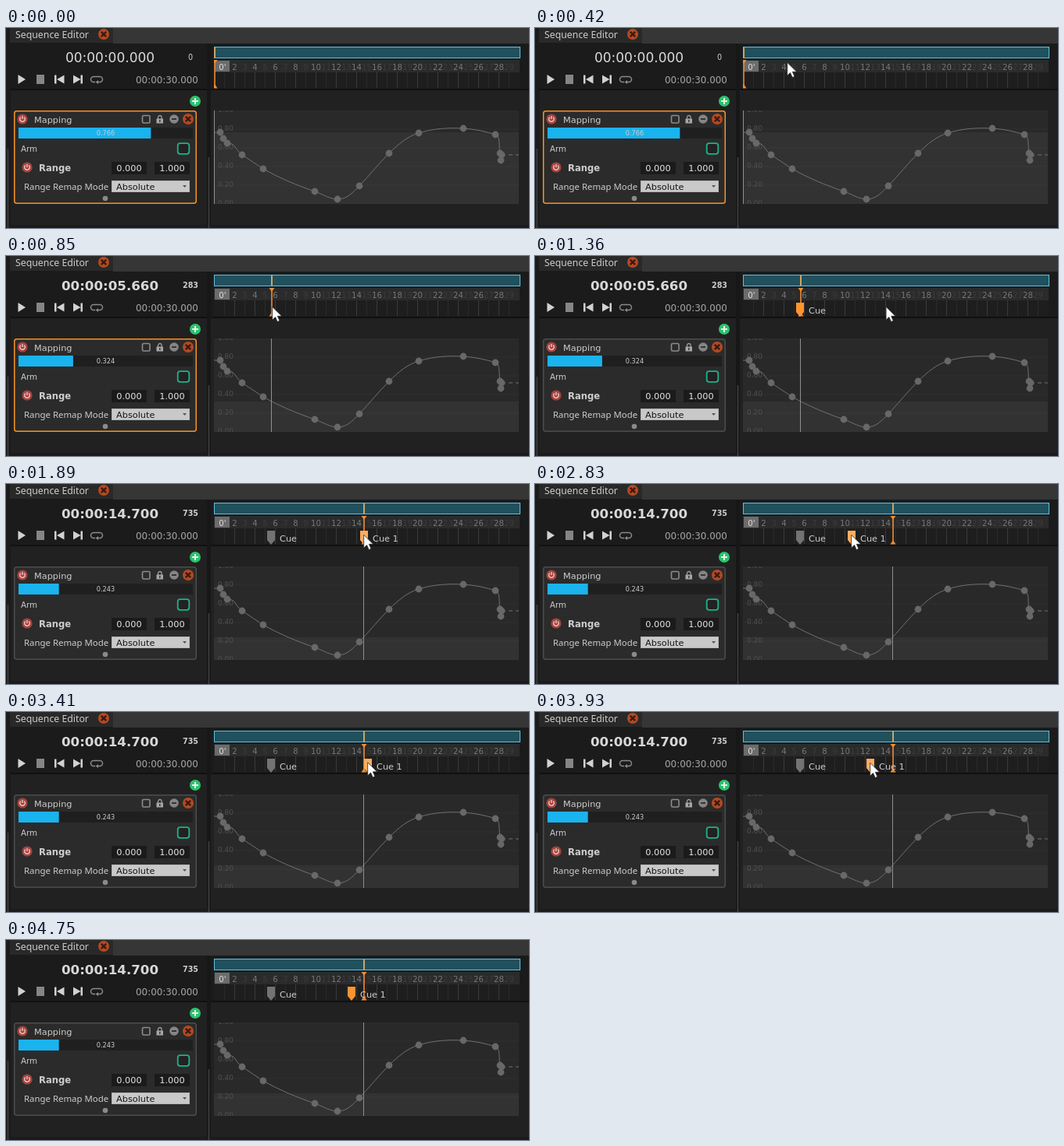
An HTML page that plays this animation: 669 px wide and 257 px high, repeating every 5060 ms.

```html
<!DOCTYPE html>
<html lang="en">
<head>
<meta charset="utf-8">
<title>Sequence Editor</title>
<style>
html, body { margin: 0; width: 100%; height: 100%; overflow: hidden; background: #1c1c1c; }
svg { display: block; width: 669px; height: 257px; }
text { font: 11.3px "DejaVu Sans", Verdana, sans-serif; fill: #cdcdcd; }
.mid { text-anchor: middle; }
.bold { font-weight: bold; }
.field { fill: #e4e4e4; }
.narrow { font-family: "Noto Sans", "Open Sans", sans-serif; }
</style>
</head>
<body>
<svg viewBox="0 0 669 257" xmlns="http://www.w3.org/2000/svg">
  <defs>
    <g id="close">
      <circle r="7" fill="#b34a22"/>
      <path d="M-3.2-3.2 3.2 3.2M3.2-3.2-3.2 3.2" stroke="#3b1a10" stroke-width="2.4"/>
    </g>
    <g id="power" fill="none">
      <circle r="6.6" fill="#a8433f"/>
      <path d="M-2.2-2.4A3.3 3.3 0 1 0 2.2-2.4M0-4V0" stroke="#e6c9c5" stroke-width="1.4"/>
    </g>
    <path id="flag" d="M-5 60H5V72L0 78-5 72Z"/>
    <clipPath id="lane"><rect x="266" y="20" width="392" height="207"/></clipPath>
    <clipPath id="plot"><rect x="266" y="106" width="390" height="120"/></clipPath>
  </defs>

  <!-- panels -->
  <rect width="669" height="257" fill="#1b1b1b"/>
  <rect x="137" width="532" height="20" fill="#363636"/>
  <rect x="5" width="132" height="19" fill="#292929"/>
  <rect x="5" y="78" width="664" height="2" fill="#111"/>
  <rect x="6" y="80" width="251" height="173" fill="#212121"/>
  <rect x="262" y="80" width="407" height="173" fill="#212121"/>
  <rect x="257" y="20" width="5" height="233" fill="#171717"/>
  <path d="M2.5 155V257M259.500 166V257" stroke="#424242" stroke-width="1.500"/>
  <text class="narrow" x="12" y="13" style="font-size:12.300px">Sequence Editor</text>
  <use href="#close" x="125" y="8"/>

  <!-- transport -->
  <text id="clock" class="mid" x="133" y="44"/>
  <text id="count" class="mid" x="236" y="41"/>
  <text x="166" y="71" style="font-size:11.9px;fill:#a6a6a6">00:00:30.000</text>
  <g fill="#d2d2d2">
    <path d="M15.500 60 25 66 15.500 72Z"/>
    <rect x="39" y="60" width="10" height="12" fill="#858585"/>
    <path d="M62 60.500H64.500V71.500H62ZM74.500 60.500V71.500L65 66Z"/>
    <path d="M98 60.500H95.500V71.500H98ZM86 60.500V71.500L95.500 66Z"/>
  </g>
  <path d="M114 69.500H112A3.500 3.500 0 0 1 112 62.500H120A3.500 3.500 0 0 1 120 69.500H116.500" fill="none" stroke="#8a8a8a" stroke-width="1.500"/>
  <path d="M114.500 69.500 118 67V72Z" fill="#8a8a8a"/>
  <circle cx="242" cy="94" r="7" fill="#2ac46c"/>
  <path d="M242 90V98M238 94H246" stroke="#eee" stroke-width="2"/>

  <!-- mapping item -->
  <rect id="item" x="10.750" y="106.750" width="232.500" height="118.500" rx="3" fill="#2b2b2b" stroke-width="1.500"/>
  <use href="#power" x="21" y="117"/>
  <text x="36" y="121.500">Mapping</text>
  <rect x="174.500" y="112.500" width="9.500" height="9.500" rx="1.500" fill="none" stroke="#8c8c8c" stroke-width="1.600"/>
  <path d="M194.500 117V114.800A2.300 2.300 0 0 1 199.100 114.800V117" fill="none" stroke="#999" stroke-width="1.300"/>
  <rect x="192.500" y="116.500" width="8.500" height="6" fill="#a6a6a6"/>
  <path d="M196.800 118V121" stroke="#2b2b2b" stroke-width="1.400"/>
  <circle cx="215" cy="117" r="5.800" fill="#858585"/>
  <path d="M212 117H218" stroke="#2b2b2b" stroke-width="1.800"/>
  <use href="#close" x="233" y="117"/>
  <rect x="16" y="128" width="223" height="14" fill="#1f1f1f"/>
  <rect id="bar" x="16" y="128" height="14" fill="#1ab3ee"/>
  <text id="value" class="mid" x="127.500" y="138" style="font-size:8.2px"/>
  <text x="19" y="159" style="font-size:10.300px">Arm</text>
  <rect x="219.700" y="148.200" width="14.600" height="13.600" rx="3" fill="#222" stroke="#1fb288" stroke-width="1.800"/>
  <use href="#power" x="27" y="179"/>
  <text class="bold" x="42" y="184" style="font-size:11.600px">Range</text>
  <rect x="135" y="172" width="45" height="16" fill="#1b1b1b"/>
  <rect x="190" y="172" width="45" height="16" fill="#1b1b1b"/>
  <text class="mid field" x="157.500" y="184">0.000</text>
  <text class="mid field" x="212.500" y="184">1.000</text>
  <text class="narrow" x="23" y="208" style="font-size:11.400px">Range Remap Mode</text>
  <rect x="135.500" y="196.500" width="99" height="14" fill="#c9c9c9" stroke="#b4b4b4"/>
  <text x="141" y="207.500" style="fill:#141414">Absolute</text>
  <path d="M226 202H231L228.500 205Z" fill="#555"/>
  <circle cx="127" cy="219" r="3.300" fill="#8a8a8a"/>

  <!-- overview and ruler -->
  <rect x="266.500" y="24.500" width="391" height="14" fill="#1f515f" stroke="#5cc2e2"/>
  <rect x="266" y="41" width="391" height="16" fill="#2b2b2b"/>
  <rect x="266" y="57" width="391" height="20" fill="#1e1e1e"/>
  <g id="ruler"></g>
  <rect x="267" y="42" width="19" height="14" fill="#6c6c6c"/>
  <text class="mid" x="277" y="53.500" style="font-size:10.200px;fill:#ddd">0'</text>

  <!-- curve -->
  <rect x="266" y="106" width="390" height="120" fill="#292929"/>
  <g clip-path="url(#plot)">
    <rect id="level" x="266" width="390" fill="#323232"/>
    <g id="scale"></g>
    <g fill="none" stroke="#717171">
      <path d="M266 134H274L278 142 283 148C294 148 291 154 302 163L329 181C350 193 372 202 395 210
        C406 214 415 220 424 220 436 220 443 212 452 203 465 189 477 174 490 161 502 149 514 139 528 135
        547 129 566 128 585 129 600 130 614 133 626 137 633 139 630 153 632 161L633 170 634 163"/>
      <path d="M634 163H656" stroke-dasharray="5 4"/>
    </g>
    <g id="nodes" fill="#686868"></g>
  </g>

  <!-- playhead -->
  <g clip-path="url(#lane)">
    <g id="head">
      <path d="M1 25V38" stroke="#c9a46a" stroke-width="2"/>
      <path d="M.5 106V226" stroke="#8f8f8f"/>
      <path d="M1 41V77" stroke="#f08c30" stroke-width="1.600"/>
      <path d="M-2.500 41H4.500L1 46ZM-2.500 77.500H4.500L1 72Z" fill="#f08c30"/>
    </g>
  </g>
  <g id="cueA"><use href="#flag"/><text x="11" y="74">Cue</text></g>
  <g id="cueB"><use href="#flag"/><text x="11" y="74">Cue 1</text></g>
  <path id="mouse" d="M.7 .3V17.200L4.500 13.500 7.200 19.500 10 18.200 7.400 12.300H12.700Z" fill="#fff" stroke="#222" stroke-width=".8"/>
</svg>

<script>
const LOOP = 5060, X0 = 266, PX = 13.03;
const $ = id => document.getElementById(id);
const timeX = s => Math.floor(X0 + s * PX);
const smooth = u => u * u * (3 - 2 * u);
const place = (el, x, y = 0) => el.setAttribute('transform', `translate(${x} ${y})`);
const show = (el, on) => el.setAttribute('visibility', on ? 'visible' : 'hidden');

// pointer moves: first step, last step, number of steps, end x, end y
const START = [572, 260];
const MOVES = [
  [60, 420, 6, 322, 44], [570, 850, 5, 340, 65], [1080, 1430, 6, 457, 65],
  [1960, 2170, 4, 459, 78], [2240, 2390, 3, 457, 65], [2460, 2670, 4, 401, 65],
  [2830, 2830, 1, 404, 65], [2900, 3120, 4, 504, 65], [3270, 3410, 3, 462, 64.5],
  [3480, 3550, 2, 424, 65], [3710, 3710, 1, 427, 65], [3930, 3930, 1, 428, 65],
  [4000, 4080, 2, 441, 65], [4540, 4680, 3, 611, 250]
];

function pointer(t) {
  let [x, y] = START;
  for (const [from, to, steps, ex, ey] of MOVES) {
    if (t < from) break;
    const done = to > from ? Math.floor((t - from) / (to - from) * (steps - 1) + 0.05) + 1 : 1;
    const u = smooth(Math.min(1, done / steps));
    x += (ex - x) * u;
    y += (ey - y) * u;
  }
  return [x, y];
}

function seconds(t) {
  if (t < 570) return 0;
  if (t >= 1650) return 14.7;
  const [x] = pointer(Math.min(t, 1000));
  return Math.round((x - 266.25) / PX * 50) / 50;
}

function curveValue(s) {
  if (!s) return 0.766;
  return s > 10 ? 0.243 : 0.324 + (5.66 - s) * 0.0477;
}

function buildStatic() {
  let marks = '', scale = '';
  for (let s = 1; s < 30; s++) {
    const x = timeX(s) + 0.5, even = s % 2 === 0;
    marks += `<path d="M${x} 57V77" stroke="${even ? '#3a3a3a' : '#2a2a2a'}"/>
      <text class="mid" x="${x}" y="54" style="font-size:10.2px;fill:${even ? '#777' : '#3c3c3c'}">${s}</text>`;
  }
  for (let i = 0; i < 6; i++) {
    const y = 226 - i * 24;
    scale += `<path d="M266 ${y}H656" stroke="#fff" opacity=".03"/>
      <text x="271" y="${y + 2}" style="font-size:9px;fill:#505050">${(i / 5).toFixed(2)}</text>`;
  }
  $('ruler').innerHTML = marks;
  $('scale').innerHTML = scale;
  const nodes = [274, 134, 278, 142, 283, 148, 302, 163, 329, 181, 395, 210, 424, 220, 452, 203,
    490, 161, 528, 135, 585, 129, 626, 137, 632, 161, 633, 170, 634, 163];
  let dots = '';
  for (let i = 0; i < nodes.length; i += 2) dots += `<circle cx="${nodes[i]}" cy="${nodes[i + 1]}" r="4.4"/>`;
  $('nodes').innerHTML = dots;
}

function drawCue(el, x, selected, mouse) {
  const hover = Math.abs(mouse[0] - x) < 6 && mouse[1] > 58 && mouse[1] < 77;
  place(el, x);
  el.firstChild.setAttribute('fill', !selected ? '#737373' : hover ? '#ffad5c' : '#ff9430');
}

function draw(t) {
  const mouse = pointer(t), s = seconds(t), v = curveValue(s), weight = s ? 'bold' : 'normal';
  const clock = $('clock'), count = $('count');
  clock.textContent = '00:00:' + s.toFixed(3).padStart(6, '0');
  clock.style.cssText = `font-size:${s ? 16.7 : 17}px;font-weight:${weight};fill:#d8d8d8`;
  count.textContent = Math.round(s * 50);
  count.style.cssText = `font-size:9.6px;font-weight:${weight}`;

  $('item').setAttribute('stroke', t < 1080 ? '#f79425' : '#4d4d4d');
  $('bar').setAttribute('width', 225 * v - 3);
  $('value').textContent = v.toFixed(3);
  $('level').setAttribute('y', 226 - 120 * v);
  $('level').setAttribute('height', 120 * v);
  place($('head'), timeX(s));

  show($('cueA'), t >= 1080);
  drawCue($('cueA'), 339, t < 1890, mouse);
  show($('cueB'), t >= 1890);
  drawCue($('cueB'), t < 2460 ? 458 : pointer(Math.min(t, 4500))[0] + 1, true, mouse);

  show($('mouse'), t >= 60 && t < 4750);
  place($('mouse'), ...mouse);
}

buildStatic();
const begin = performance.now();
function tick() {
  draw((performance.now() - begin) % LOOP);
  requestAnimationFrame(tick);
}
tick();
</script>
</body>
</html>
```
